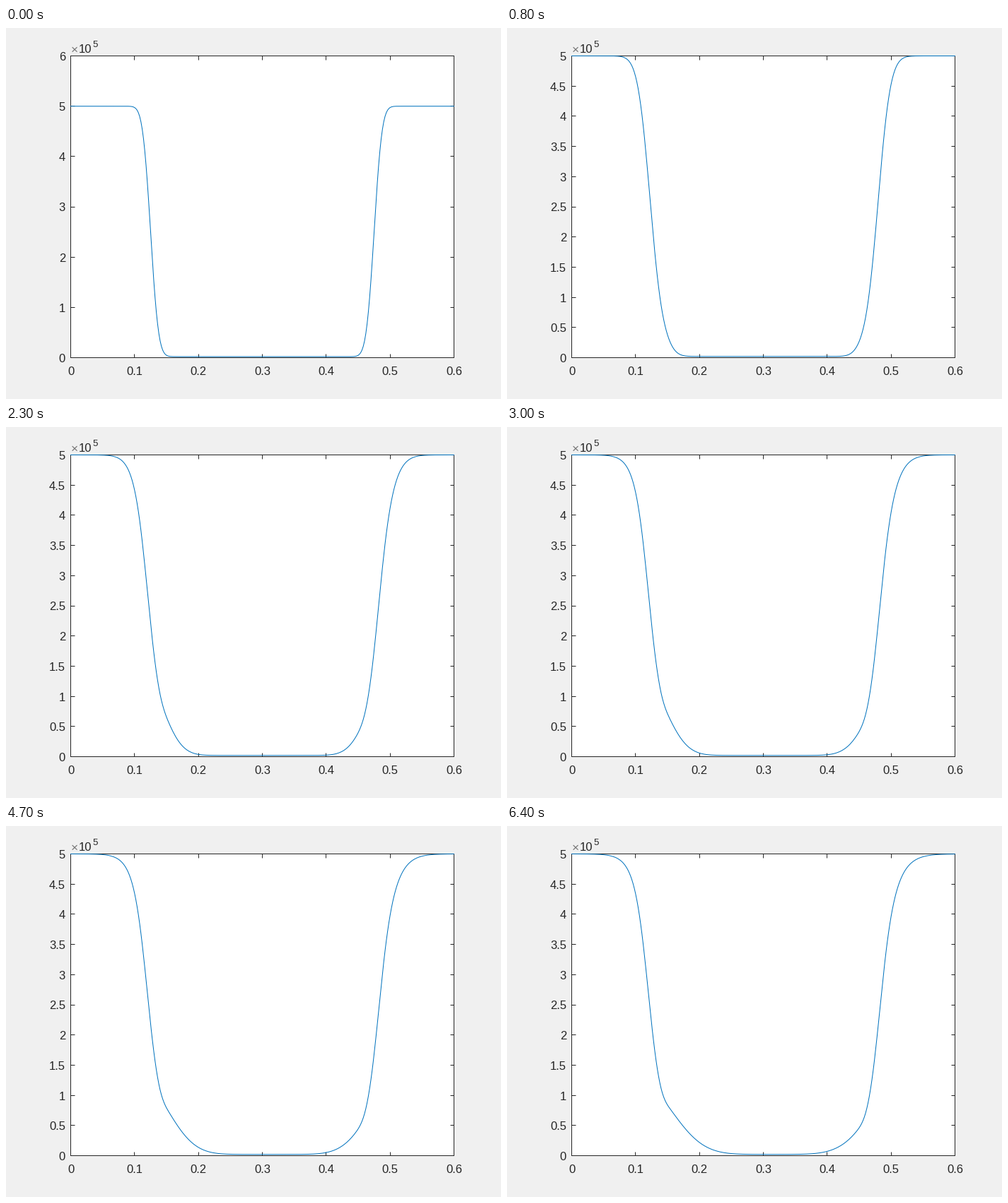
These frames come from a looping animation (700 px wide and 525 px high, 6500 ms). A matplotlib script:

```python
import math

import matplotlib.pyplot as plt
import numpy as np
from matplotlib.animation import FuncAnimation
from matplotlib.transforms import Affine2D

W, H, DPI = 700, 525, 100
FRAMES, INTERVAL = 65, 100
LEFT, RIGHT, TOP, BOTTOM = 91, 633, 39, 466
PX = 72 / DPI  # one pixel in points
INK = "#262626"

LENGTH, HIGH, LOW = 0.6, 5.0, 0.02
START = (0.125, 0.475)   # where the first profile falls and rises
HOLD = (0.119, 0.481)    # the same for the profile it is pulled to
FREE = (0.155, 0.445)    # no pull between these
TAPER = 0.015            # distance over which the pull sets in
WIDTH = 0.0098           # softness of both profiles
DIFF = 1.35e-5           # diffusion per frame
DRIFT = 2.2e-4           # rightward drift per frame
RELAX = 0.062            # strength of the pull per frame
SUBSTEPS = 16

x = np.linspace(0, LENGTH, 301)


def well(edges):
    s = WIDTH * math.sqrt(2)
    fall, rise = (np.array([math.erf((v - e) / s) for v in x]) for e in edges)
    return LOW + (HIGH - LOW) * (1 + (rise - fall) / 2)


def solve():
    dx, dt = x[1] - x[0], 1 / SUBSTEPS
    hold = well(HOLD)
    outside = np.maximum(FREE[0] - x, x - FREE[1])
    pull = RELAX * np.clip(outside / TAPER, 0, 1)
    u = well(START)
    rows = [u]
    for _ in range(FRAMES - 1):
        for _ in range(SUBSTEPS):
            p = np.pad(u, 1, mode="edge")
            curve = (p[2:] - 2 * u + p[:-2]) / dx**2
            slope = (p[2:] - p[:-2]) / (2 * dx)
            u = u + dt * (DIFF * curve - DRIFT * slope + pull * (hold - u))
        rows.append(u)
    return rows


profiles = solve()

plt.rcParams["font.family"] = "Liberation Sans"
fig = plt.figure(figsize=(W / DPI, H / DPI), dpi=DPI, facecolor="#f0f0f0")
ax = fig.add_axes([LEFT / W, 1 - BOTTOM / H, (RIGHT - LEFT) / W, (BOTTOM - TOP) / H])
for spine in ax.spines.values():
    spine.set(linewidth=PX, color=INK)
ax.tick_params(direction="in", length=5.5 * PX, width=PX, color=INK, top=True,
               right=True, labelbottom=False, labelleft=False)
ax.set_xlim(0, LENGTH)
ax.set_xticks(np.arange(7) / 10)


def label(px, py, text, size=12, color=INK, ha="left"):
    return fig.text(px / W, 1 - py / H, text, size=size, color=color, ha=ha)


def scale(top, step):
    ticks = np.arange(0, top + step / 2, step)
    texts = [label(84, BOTTOM - t / top * (BOTTOM - TOP) + 7, f"{t:g}", ha="right")
             for t in ticks]
    return top, ticks, texts


for i in range(7):
    label(LEFT + 0.5 + i / 6 * (RIGHT - LEFT), 491, f"{i / 10:g}", ha="center")
label(92, 36, "×", 12.5, "#777777")
label(103, 35, "10")
label(122.5, 27, "5", 9.6)
coarse, fine = scale(6, 1), scale(5, 0.5)

# pixel centres, to sit on the frame lines
line, = ax.plot([], [], color="#0072bd", lw=PX, clip_on=False, zorder=5,
                transform=ax.transData + Affine2D().translate(0.5, -0.5))


def draw(i):
    shown = coarse if i == 0 else fine
    for top, ticks, texts in (coarse, fine):
        for t in texts:
            t.set_visible(texts is shown[2])
    ax.set_ylim(0, shown[0])
    ax.set_yticks(shown[1])
    line.set_data(x, profiles[i])
    return line,


anim = FuncAnimation(fig, draw, frames=FRAMES, interval=INTERVAL, repeat=True,
                     repeat_delay=0, init_func=lambda: draw(0), blit=False)
plt.show()
```
